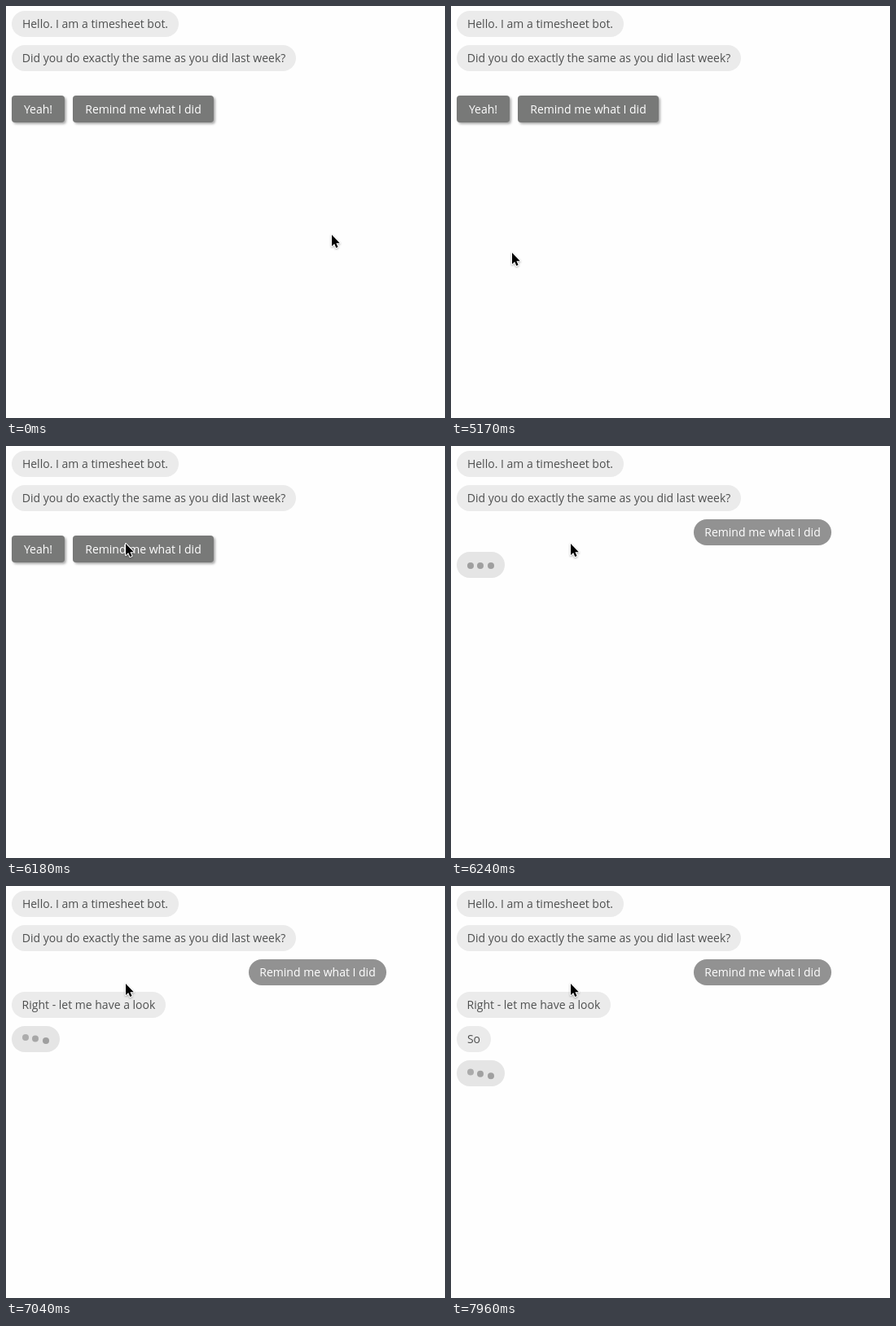
An HTML page that plays this animation: 539 by 506 pixels, repeating every 8000 ms.

```html
<!DOCTYPE html>
<html lang="en">
<head>
<meta charset="utf-8">
<title>Timesheet bot</title>
<style>
  html, body { margin: 0; width: 100%; height: 100%; overflow: hidden; background: #fefefe; }
  body { position: relative; font: 14px "Open Sans", sans-serif; }
  div, svg { position: absolute; }
  .bubble { left: 7px; height: 32px; line-height: 32px; border-radius: 16px;
            background: #ebebeb; color: #4f5050; text-align: center; white-space: nowrap; }
  .reply { left: 298px; background: #929292; color: #fff; }
  .button { top: 110px; height: 33px; line-height: 33px; border-radius: 4px;
            background: #787978; color: #fff; text-align: center; white-space: nowrap;
            box-shadow: 2px 2px 3px rgba(0, 0, 0, .32); }
  #typing { width: 59px; background: #e5e5e5; }
  .dot { top: 13px; width: 8px; height: 8px; border-radius: 50%; background: #9f9f9f; }
  #cursor { left: 0; top: 0; overflow: visible; filter: drop-shadow(0 1px 1px rgba(0, 0, 0, .3)); }
</style>
</head>
<body>
<div class="bubble" style="top:6px;width:205px">Hello. I am a timesheet bot.</div>
<div class="bubble" style="top:48px;width:349px">Did you do exactly the same as you did last week?</div>
<div class="button" data-to="6240" style="left:7px;width:65px">Yeah!</div>
<div class="button" data-to="6240" style="left:82px;width:173px">Remind me what I did</div>
<div class="bubble reply" data-from="6240" style="top:90px;width:169px">Remind me what I did</div>
<div class="bubble" data-from="6300" style="top:130px;width:189px">Right - let me have a look</div>
<div class="bubble" data-from="7730" style="top:172px;width:42px">So</div>
<div class="bubble" id="typing" data-from="6240">
  <div class="dot" style="left:13px"></div>
  <div class="dot" style="left:25px"></div>
  <div class="dot" style="left:38px"></div>
</div>
<svg id="cursor" width="12" height="18">
  <path d="M0 0V14L3.2 11L5.3 16L7.6 15L5.4 10.2H9.8Z"
        stroke="#fff" stroke-width="2" stroke-linejoin="round" paint-order="stroke"/>
</svg>
<script>
const LOOP = 8000;
const DOTS_START = 6300, DOT_PERIOD = 1000, DOT_DELAY = 150, DOT_SWING = 3;

// Pointer positions; each move holds one point per step.
const moves = [
  { start: 0, step: 420, points: [[400, 281]] },
  { start: 420, step: 64, points: [[364, 243], [285, 210], [196, 216], [124, 256], [86, 302], [76, 320]] },
  { start: 5170, step: 59, points: [[75, 303], [67, 268], [54, 222], [38, 176], [30, 144], [33, 129],
                                    [54, 126], [85, 124], [116, 123], [138, 122], [147, 122]] },
  { start: 6180, step: 60, points: [[147, 120]] }
];

const timed = document.querySelectorAll("[data-from], [data-to]");
const typing = document.getElementById("typing");
const dots = document.querySelectorAll(".dot");
const cursor = document.getElementById("cursor");

function pointerAt(t) {
  const { start, step, points } = moves.filter(m => t >= m.start).pop();
  return points[Math.min(points.length - 1, Math.floor((t - start) / step))];
}

function draw(t) {
  for (const el of timed) {
    const { from = 0, to = LOOP } = el.dataset;
    el.style.visibility = t >= +from && t < +to ? "visible" : "hidden";
  }
  typing.style.top = (t < 6300 ? 130 : t < 7730 ? 172 : 214) + "px";
  dots.forEach((dot, i) => {
    const elapsed = Math.max(0, t - DOTS_START - i * DOT_DELAY);
    const wave = Math.sin(2 * Math.PI * elapsed / DOT_PERIOD);
    dot.style.transform = `translateY(${DOT_SWING * wave}px)`;
    dot.style.opacity = 1 - 0.2 * Math.max(0, -wave);
  });
  const [x, y] = pointerAt(t);
  cursor.style.transform = `translate(${x}px, ${y}px)`;
}

const origin = performance.now();
function tick() {
  draw((performance.now() - origin) % LOOP);
  requestAnimationFrame(tick);
}
tick();
</script>
</body>
</html>
```
